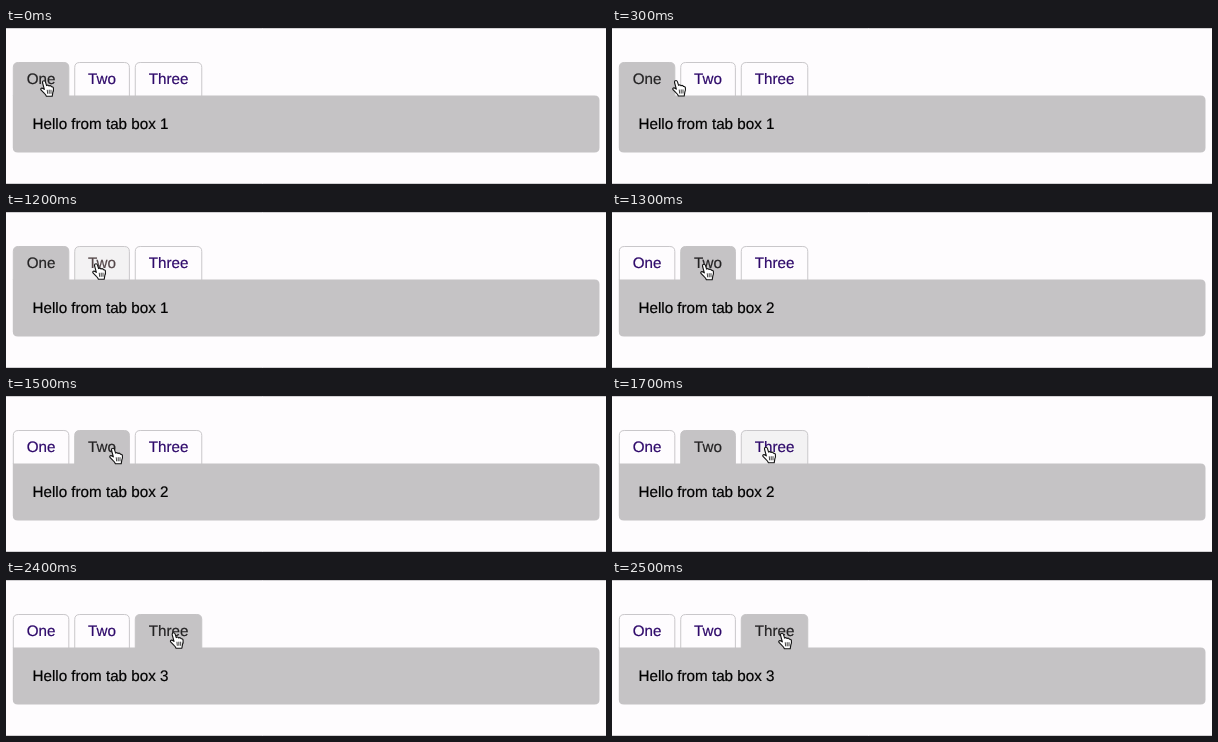
Write an HTML page that moves like this. It is 600 px wide and 156 px high and loops after 2600 ms.

```html
<!DOCTYPE html>
<html lang="en">
<head>
<meta charset="utf-8">
<title>Tabs</title>
<style>
  html, body { margin: 0; width: 100%; height: 100%; overflow: hidden; background: #fefcfe; }
  svg { display: block; width: 600px; height: 156px; }
  text {
    font: 15.2px "Liberation Sans", Arial, sans-serif;
    text-rendering: geometricPrecision;
    stroke: currentColor; stroke-width: .2px; fill: currentColor;
  }
</style>
</head>
<body>
<svg viewBox="0 0 600 156">
  <path d="M0 .5H600M0 155.5H600" stroke="#d3d1d4"/>
  <g id="tabs"></g>
  <path fill="#c5c3c5" d="M6.8 67.5H588.5q5 0 5 5V119.5q0 5-5 5H11.8q-5 0-5-5Z"/>
  <text id="message" x="26.5" y="101"></text>
  <g id="hand" stroke="#111" stroke-linejoin="round" stroke-linecap="round">
    <path fill="#fff" stroke-width="1.1" d="M4.3 9.2L2.6 3Q2.2 1 3.8 .8Q5 .6 5.5 2.2L6.6 5.6Q7.3 4.8 8.2 5.2Q8.8 5.4 9 6Q10 5.3 11 6Q11.3 6.2 11.4 6.8Q13 6.4 13.4 8Q13.8 10.6 12.8 12.6L12.2 16.3H6.4Q5.8 14.6 4.4 13.4L1.2 10.2Q.2 8.8 1.4 8.2Q2.4 7.8 4.3 9.4Z"/>
    <path fill="none" stroke-width=".8" d="M7.3 10.2L7.6 13.4M9.2 10.1V13.4M11 10.1V13.4"/>
  </g>
</svg>
<script>
const LOOP = 2600, STEP = 100, CLICKS = [1300, 2400];
const PAD = 13.9, GAP = 4.9, GREY = '#c5c3c5';
const $ = id => document.getElementById(id);

function add(name) {
  return $('tabs').appendChild(document.createElementNS('http://www.w3.org/2000/svg', name));
}

// Each tab is as wide as its label plus padding.
let edge = 6.8;
const tabs = ['One', 'Two', 'Three'].map(label => {
  const shape = add('path'), text = add('text');
  text.textContent = label;
  const left = edge, right = left + text.getComputedTextLength() + 2 * PAD;
  text.setAttribute('x', left + PAD);
  text.setAttribute('y', 56);
  shape.setAttribute('d', `M${left + .5} 68V39.5q0-5 5-5H${right - 5.5}q5 0 5 5V68`);
  edge = right + GAP;
  return { left, right, shape, text };
});

// Pointer stops: time, x, y
const stops = [
  [0, 34, 52], [600, 86, 51.5], [700, 86, 51.5], [800, 92, 49], [1200, 86, 51], [1300, 88, 51.5],
  [1500, 103, 51.5], [1700, 150, 50.5], [2100, 157, 50.5], [2200, 157, 50.5], [2500, 166, 52.5]
];

function pointer(t) {
  const i = stops.findIndex(s => s[0] >= t);
  const a = stops[Math.max(i - 1, 0)], b = stops[i];
  const k = (t - a[0]) / (b[0] - a[0] || 1);
  const ease = k * k * (3 - 2 * k);
  return [1, 2].map(n => a[n] + (b[n] - a[n]) * ease);
}

function draw(now) {
  const t = Math.floor(now % LOOP / STEP) * STEP;
  const [x, y] = pointer(t);
  const selected = CLICKS.filter(c => t >= c).length;
  const pressed = CLICKS.includes(t + STEP);

  tabs.forEach(({ left, right, shape, text }, i) => {
    const on = i === selected;
    const hover = x + 4 >= left && x + 4 < right;
    shape.setAttribute('fill', on ? GREY : hover ? '#f3f2f3' : '#fefcfe');
    shape.setAttribute('stroke', on ? GREY : '#c9c7ca');
    text.style.color = on ? '#242324' : hover && pressed ? '#544749' : '#2f0a6b';
  });
  $('message').textContent = 'Hello from tab box ' + (selected + 1);
  $('hand').setAttribute('transform', `translate(${x} ${y})`);
}

const start = performance.now();
function tick() {
  draw(performance.now() - start);
  requestAnimationFrame(tick);
}
tick();
</script>
</body>
</html>
```
